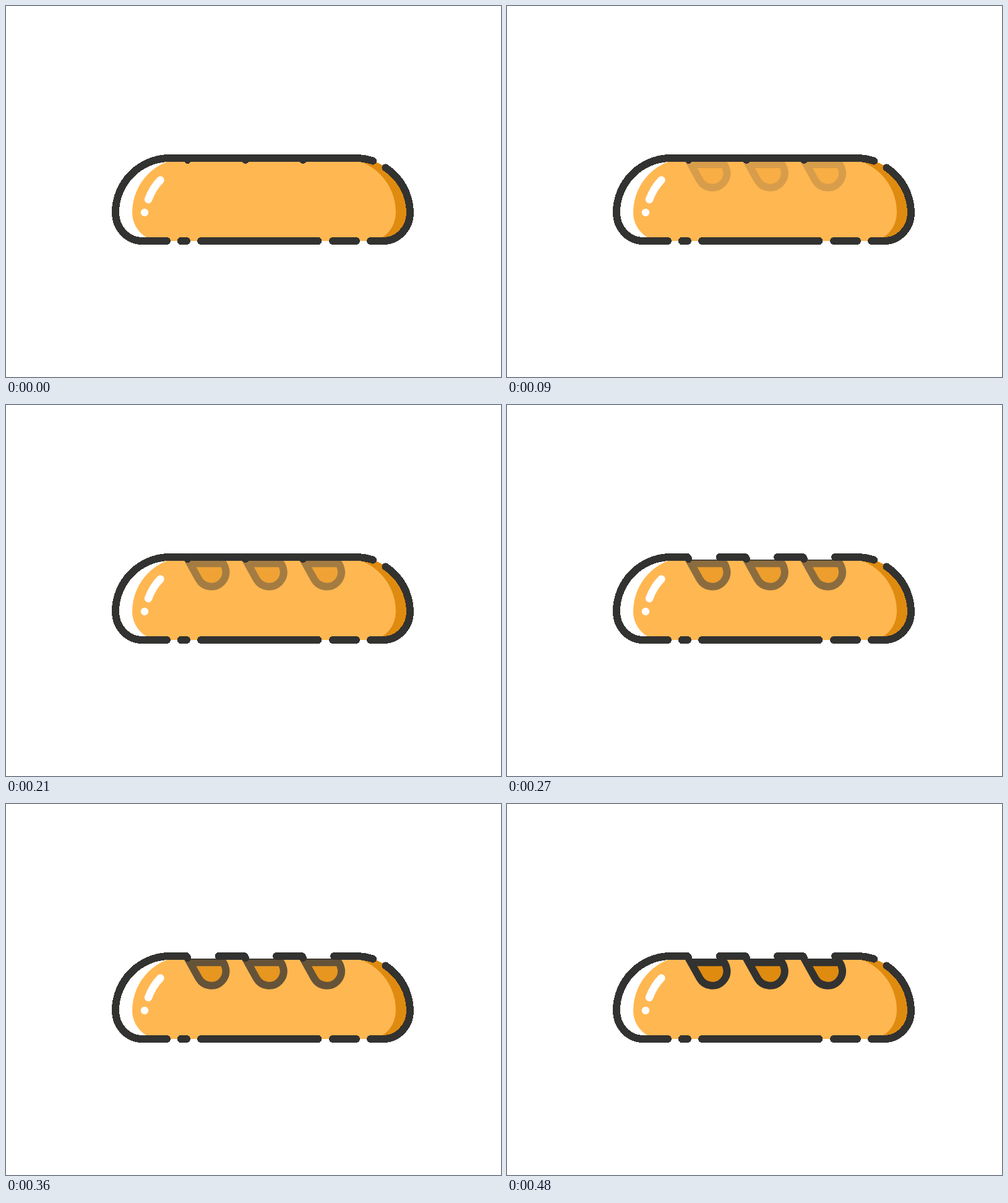
An HTML page for the animation above (1.08 s loop, 800 by 600 pixels).

```html
<!DOCTYPE html>
<html lang="en">
<head>
<meta charset="utf-8">
<title>Bread</title>
<style>
  html, body { margin: 0; width: 100%; height: 100%; overflow: hidden; background: #fff; }
  svg { display: block; width: 100%; height: 100%; }
  .line { fill: none; stroke: #323231; stroke-width: 12; stroke-linecap: round; stroke-linejoin: round; }
  .crisp { shape-rendering: crispEdges; }
  .shine { fill: none; stroke: #fff; stroke-width: 12.4; stroke-linecap: round; }
</style>
</head>
<body>
<svg viewBox="0 0 800 600">
  <defs>
    <clipPath id="below"><rect x="160" y="250" width="510" height="140"/></clipPath>
    <g id="cut">
      <path fill="#df8b10" d="M299 256L311.6 282A23.5 23.5 0 1 0 350.500 256Z"/>
      <path class="line" d="M291.500 246L311.6 282A23.5 23.5 0 1 0 343 249.500M301 256.300H350"/>
    </g>
  </defs>

  <g clip-path="url(#below)">
    <path fill="#df8b10" d="M540 246H565A88 88 0 0 1 653 334A43 46 0 0 1 610 380H540Z"/>
    <path fill="#ffb751" d="M292 246H542A88 88 0 0 1 630 334A43 46 0 0 1 587 380H249A45 46 0 0 1 204 334A88 88 0 0 1 292 246Z"/>
  </g>
  <path class="shine" d="M249.500 281.500Q237 294 230 313M224 334h.01"/>

  <path fill="#323231" d="M293 250H530V251.500H293Z"/>
  <g id="cuts" clip-path="url(#below)" opacity="0">
    <use href="#cut"/>
    <use href="#cut" x="93.300"/>
    <use href="#cut" x="186.600"/>
  </g>

  <path class="line crisp" d="M260 380H220A43 46 0 0 1 177 334A88 88 0 0 1 265 246H291.500l2 3M343.500 246H385l2 3M437 246H478l2 3M530 246H565A88 88 0 0 1 593 250.600M613.500 261.500A88 88 0 0 1 653 334A43 46 0 0 1 610 380H589M282.500 380H292M315 380H504.500M528 380H566"/>
  <path id="top" class="line crisp" d="M292 246H530"/>
</svg>
<script>
  const LOOP = 1080, STEP = 30, FADE = 480;
  const cuts = document.getElementById("cuts");
  const topLine = document.getElementById("top");

  function draw(now) {
    const t = Math.floor((now % LOOP) / STEP) * STEP;
    cuts.setAttribute("opacity", Math.min(1, t / FADE));
    // the closed top edge opens abruptly past the middle of the fade
    topLine.setAttribute("visibility", t > FADE / 2 ? "hidden" : "visible");
  }

  const start = performance.now();
  function tick() {
    draw(performance.now() - start);
    requestAnimationFrame(tick);
  }
  tick();
</script>
</body>
</html>
```
